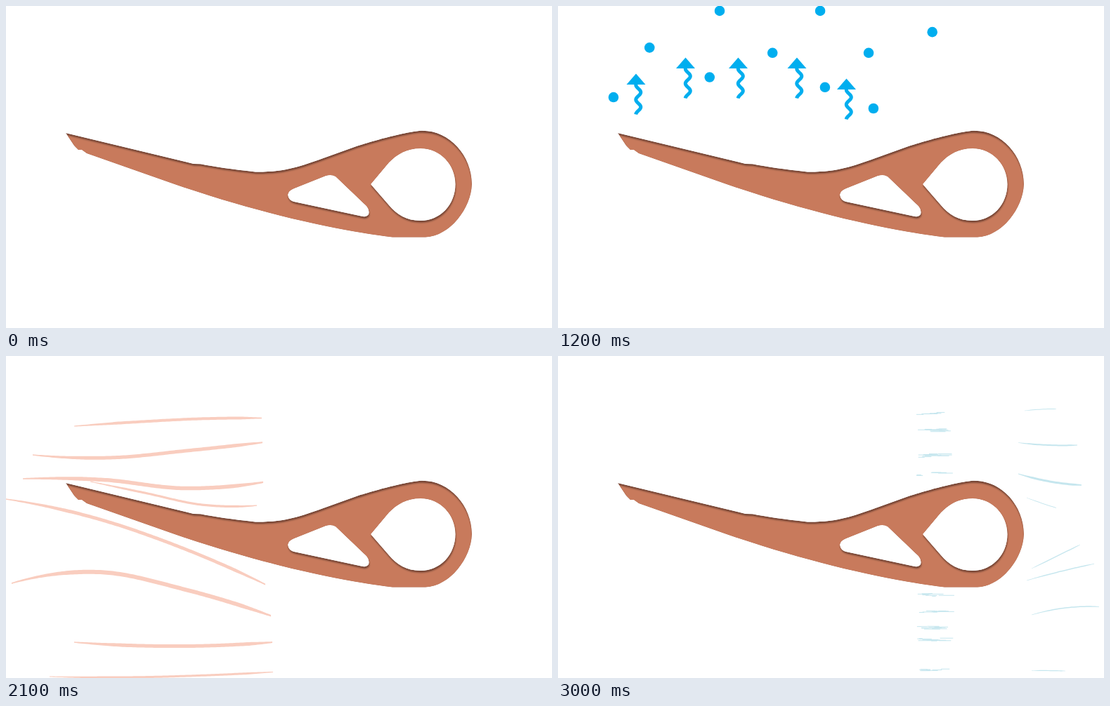
An HTML page for the animation above (3300 ms loop, 777 by 459 pixels).

```html
<!DOCTYPE html>
<html lang="en">
<head>
<meta charset="utf-8">
<title>Airfoil flow</title>
<style>
html, body { margin: 0; width: 777px; height: 459px; overflow: hidden; background: #fff; }
svg { display: block; }
</style>
</head>
<body>
<svg width="777" height="459" viewBox="0 0 777 459">
  <defs>
    <path id="foil" d="M85,181 L267,225 277,225.3 Q305,231 355,236.500 C398,237 420,228 450,217.500 L500,199.500 C530,190 568,180 588,178 C629,175 663,212 663,254 C662,288 632,328 597,329.500 H550 C470,320 360,295 240,254 L115,210 108,205 103,205 97,199 Z
      M519,254 L545,223 C557,211 570,203 590,203 C618,203 639.500,226 639.500,254 C639.500,283 618,306 590,306 C570,306 556,297 545,284 Z
      M410,260 L455,242 Q463,239.500 469,243 L513,285 Q518,291 516,297 Q513,302 503,299 L410,279 Q402,277 401,269 Q402,263 410,260 Z"/>
    <clipPath id="edge"><use href="#foil" clip-rule="evenodd"/></clipPath>
    <filter id="soft" x="-5%" y="-5%" width="110%" height="110%"><feGaussianBlur stdDeviation="1"/></filter>
    <linearGradient id="wipe" gradientUnits="userSpaceOnUse" x1="185" x2="250" y1="0" y2="0">
      <stop offset="0" stop-color="#f9cdbf"/>
      <stop offset=".5" stop-color="#ebd5ca"/>
      <stop offset="1" stop-color="#e9ded6"/>
    </linearGradient>
    <g id="arrow" fill="#00aeef">
      <path d="M0,0 L13.500,15.500 H-13.500 Z"/>
      <path id="wave" fill="none" stroke="#00aeef" stroke-width="5"/>
    </g>
  </defs>
  <rect width="777" height="459" fill="#fff"/>
  <g id="warm"></g>
  <g id="cool" fill="#bce4ee"></g>
  <g id="wake" fill="#c5e6ee"></g>
  <g id="dots" fill="#00aeef"></g>
  <g id="arrows"></g>
  <g clip-path="url(#edge)" style="clip-rule:evenodd">
    <use href="#foil" fill="#744434" fill-rule="evenodd"/>
    <use href="#foil" fill="#c87a5c" fill-rule="evenodd" transform="translate(.6 2.8)" filter="url(#soft)"/>
  </g>
</svg>
<script>
const STEP = 300, STEPS = 11;
const $ = id => document.getElementById(id);

function add(parent, tag, attrs) {
  const el = document.createElementNS('http://www.w3.org/2000/svg', tag);
  for (const k in attrs) el.setAttribute(k, attrs[k]);
  $(parent).appendChild(el);
  return el;
}

let seed = 7;
const random = () => (seed = seed * 16807 % 2147483647) / 2147483647;

// Streams: left x, right x, thickness, then evenly spaced heights
const stream = ([x0, x1, w, ...ys]) => ({ x0, x1, w, ys });

const warm = [
  [97, 365, 4, 100, 94, 89.5, 88.5],
  [38, 367, 5, 141, 145, 135, 123],
  [24, 368, 5.5, 175, 176.5, 188.5, 179.5],
  [120, 358, 3.2, 179, 195.5, 212, 213],
  [0, 370, 5, 204, 230, 272, 326],
  [8, 379, 6, 324, 308, 333, 371],
  [97, 380, 5, 408, 413, 413, 408],
  [62, 380, 3, 457, 458, 455.5, 450.5]
].map(stream);

const cool = [
  [427, 537, 2, 87, 84, 81],
  [414, 543, 4.5, 118.5, 108.5, 106],
  [403, 547, 5.5, 169, 146, 142],
  [416, 536, 2.3, 201, 178, 166.5],
  [420, 541, 2.6, 316, 333, 342],
  [420, 543, 3.2, 345, 361.5, 363],
  [417, 549, 4.8, 380, 385.5, 387],
  [427, 549, 4, 406, 405, 404],
  [431, 551, 2.2, 448.5, 448, 447]
].map(stream);

const wake = [
  [664, 711, 1, 78, 76, 75.5],
  [655, 739, 2, 123.5, 127, 127],
  [655, 746, 3, 168, 179, 184],
  [667, 711, 1, 202, 210, 217],
  [674, 743, 1.5, 303, 286, 269],
  [667, 764, 1.5, 320, 307, 296],
  [674, 771, 1.5, 369, 359, 357.5],
  [674, 723, 1.2, 448.5, 448.5, 449]
].map(stream);

// Smooth curve through the heights, continued as a parabola past both ends
function yAt({ x0, x1, ys }, x) {
  const n = ys.length - 1, pos = (x - x0) / (x1 - x0) * n;
  const i = Math.max(0, Math.min(n - 1, Math.floor(pos))), u = pos - i, v = 1 - u;
  const y = k => k < 0 ? 3 * ys[0] - 3 * ys[1] + ys[2]
    : k > n ? 3 * ys[n] - 3 * ys[n - 1] + ys[n - 2] : ys[k];
  const slope = k => (y(k + 1) - y(k - 1)) / 2;
  return y(i) * (1 + 2 * u) * v * v + y(i + 1) * u * u * (3 - 2 * u)
    + u * v * (slope(i) * v - slope(i + 1) * u);
}

function ribbon(s, to = s.x1) {
  const up = [], down = [];
  for (let x = s.x0; x <= to; x += 3) {
    const u = (x - s.x0) / (s.x1 - s.x0), y = yAt(s, x);
    const half = s.w / 2 * Math.max(.3, Math.min(1, .3 + 3 * u, .4 + 5 * (1 - u)));
    up.push([x, (y - half).toFixed(2)]);
    down.unshift([x, (y + half).toFixed(2)]);
  }
  return 'M' + [...up, ...down].join('L') + 'Z';
}

// The first front bows forward away from the foil
const front = s => 229 + (yAt(s, 235) - 220) ** 2 / 1300;

const shapes = (id, list) => list.map(s => ({ s, el: add(id, 'path', { d: ribbon(s) }) }));
const warmShapes = shapes('warm', warm), coolShapes = shapes('cool', cool);
shapes('wake', wake);

// Scattered remains of the cool streams
for (const s of cool) {
  for (let k = 0; k < 2 + s.w * 2; k++) {
    const x = 510 + random() * 35;
    add('wake', 'rect', {
      x, y: yAt(s, x) + (random() - .5) * s.w - .5, width: 5 + random() * 18, height: 1
    });
  }
}

const dots = [[102, 145.5], [147, 83.5], [222, 120.5], [234.5, 37.5], [300.5, 90],
  [360, 37.5], [366, 133], [420.5, 90], [426.5, 159.5], [500, 64]];
for (const [cx, cy] of dots) add('dots', 'circle', { cx, cy, r: 6.4 });

const wave = [];
for (let y = 15; y <= 58; y++) wave.push([3.3 - 3.5 * Math.cos((y - 16) * Math.PI / 10.5), y]);
$('wave').setAttribute('d', 'M' + wave.join('L'));
for (const [x, y] of [[111, 166], [181.5, 143], [256.5, 143], [340, 143], [410.5, 173]])
  add('arrows', 'use', { href: '#arrow', x, y });

const show = (id, on) => $(id).setAttribute('visibility', on ? 'visible' : 'hidden');
const rise = [0, 30, 69.5, 132];

function render(ms) {
  const s = Math.floor(ms / STEP) % STEPS;
  show('dots', s >= 1 && s <= 5);
  $('dots').setAttribute('transform', s === 3 || s === 4 ? 'matrix(1.14 0 0 1.14 -37.3 -35.8)' : '');
  show('arrows', s >= 2 && s <= 5);
  $('arrows').setAttribute('transform', `translate(0 ${-(rise[s - 2] || 0)})`);

  show('warm', s >= 6 && s <= 8);
  $('warm').setAttribute('fill', s === 6 ? 'url(#wipe)' : '#f9cdbf');
  for (const { el, s: line } of warmShapes) el.setAttribute('d', ribbon(line, s === 6 ? front(line) : line.x1));

  show('cool', s === 8 || s === 9);
  for (const { el, s: line } of coolShapes) el.setAttribute('d', ribbon(line, line.x1 + (s === 9 ? 35 : 0)));

  show('wake', s === 10);
}

const start = performance.now();
function tick() {
  render(performance.now() - start);
  requestAnimationFrame(tick);
}
tick();
</script>
</body>
</html>
```
